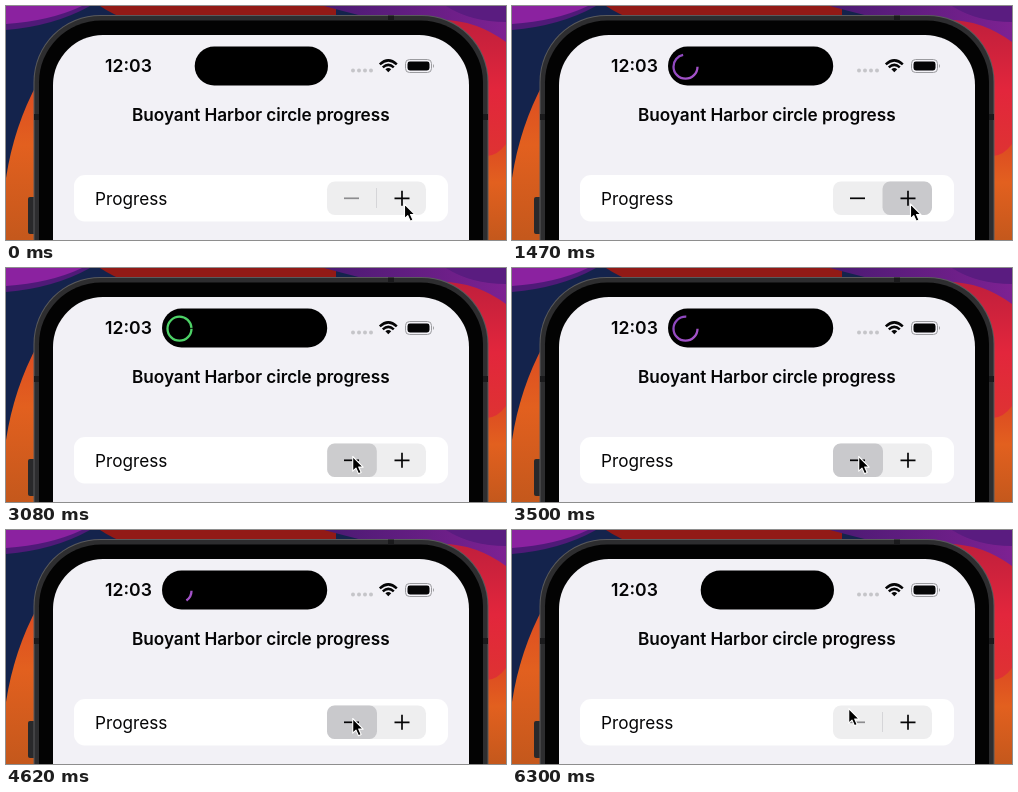
These frames come from a looping animation (500x234 px, 6370 ms). An HTML page:

```html
<!DOCTYPE html>
<html lang="en">
<head>
<meta charset="utf-8">
<title>Circle progress</title>
<style>
html, body { margin: 0; width: 100%; height: 100%; overflow: hidden; background: #14234c; }
svg { display: block; width: 500px; height: 234px; }
text { font-family: Inter, "Liberation Sans", sans-serif; fill: #050506; }
</style>
</head>
<body>
<svg viewBox="0 0 500 234">
  <defs>
    <linearGradient id="flame" x1="0" y1="0" x2="0" y2="1">
      <stop offset="0" stop-color="#dc4a22"/><stop offset=".4" stop-color="#e2601f"/><stop offset="1" stop-color="#c4581c"/>
    </linearGradient>
    <linearGradient id="rose" x1="0" y1="0" x2="0" y2="1">
      <stop offset="0" stop-color="#c01f3c"/><stop offset=".4" stop-color="#e2263c"/><stop offset="1" stop-color="#dc3a2c"/>
    </linearGradient>
    <linearGradient id="plum" x1="0" y1="0" x2="1" y2="0">
      <stop offset="0" stop-color="#4a1a72"/><stop offset="1" stop-color="#7d2192"/>
    </linearGradient>
    <linearGradient id="violet" gradientUnits="userSpaceOnUse" x1="161" y1="48" x2="186" y2="73">
      <stop offset="0" stop-color="#8a45bd"/><stop offset="1" stop-color="#a955cb"/>
    </linearGradient>
  </defs>

  <!-- wallpaper -->
  <rect width="500" height="234" fill="#14234c"/>
  <path d="M0 0H84Q48 20 0 24Z" fill="#4f1a78"/>
  <path d="M0 0H76Q44 15 0 18Z" fill="#8b22a0"/>
  <path d="M94 0H330V14H122Q106 8 94 0Z" fill="#921a16"/>
  <path d="M318 0H500V50L440 30Q370 14 318 0Z" fill="url(#plum)"/>
  <path d="M436 14Q470 14 500 36V190H470V60Z" fill="url(#rose)"/>
  <path d="M440 0H500V16Q465 16 440 0Z" fill="#5a1c80"/>
  <path d="M0 172Q8 120 32 76V234H0Z" fill="url(#flame)"/>
  <path d="M476 150Q490 152 500 138V234H476Z" fill="url(#flame)"/>

  <!-- phone -->
  <rect x="22" y="191" width="8" height="37" rx="2" fill="#29292b"/>
  <rect x="27.5" y="9" width="455" height="400" rx="67" fill="#5a5a5c"/>
  <rect x="28.5" y="10" width="453" height="400" rx="66" fill="#2d2d2f"/>
  <rect x="33" y="14.5" width="444" height="400" rx="62" fill="#030303"/>
  <path d="M28 108h5v6h-5zM477 108h5v6h-5zM382 9.5h6v5h-6z" fill="#1a1a1c"/>
  <rect x="47" y="29" width="416" height="380" rx="50" fill="#f2f1f6"/>

  <!-- status bar -->
  <text x="122.5" y="66" font-size="17.6" font-weight="600" text-anchor="middle">12:03</text>
  <g fill="#c5c5c9">
    <circle cx="347" cy="64.5" r="2"/><circle cx="353" cy="64.5" r="2"/>
    <circle cx="359" cy="64.5" r="2"/><circle cx="365" cy="64.5" r="2"/>
  </g>
  <g fill="none" stroke="#050506" stroke-width="2.5">
    <path d="M373.8 58.3Q382.3 50.4 390.8 58.3"/>
    <path d="M376.8 61.4Q382.3 56.4 387.8 61.4"/>
  </g>
  <path d="M379.4 63.3Q382.3 60.8 385.2 63.3L382.3 66.3Z" fill="#050506"/>
  <rect x="399.5" y="53.5" width="26" height="13" rx="4" fill="none" stroke="#9b9b9f"/>
  <rect x="401.5" y="55.5" width="22" height="9" rx="2.4" fill="#050506"/>
  <path d="M427 58Q429 60 427 62Z" fill="#9b9b9f"/>

  <!-- island -->
  <rect id="island" y="40.5" height="39" rx="19.5" fill="#000"/>
  <g id="badge" fill="none">
    <circle id="ring" cx="173.5" cy="60.7" r="12" pathLength="1" stroke-width="2.3"/>
    <path id="tick" d="M168.3 61.3L172 65L178.8 56.8" stroke="#4dd267" stroke-width="1.5" pathLength="1"/>
  </g>

  <text x="254.8" y="115" font-size="17.2" font-weight="600" letter-spacing="-.04" text-anchor="middle">Buoyant Harbor circle progress</text>

  <!-- stepper row -->
  <rect x="68" y="169" width="374" height="46.5" rx="11" fill="#fff"/>
  <text x="89" y="199" font-size="17.2">Progress</text>
  <rect x="321" y="175.5" width="99" height="33.5" rx="8" fill="#eeeeef"/>
  <path id="split" d="M370.5 182V202" stroke="#d5d5d8"/>
  <rect id="lessBg" x="321" y="175.5" width="50" height="33.5" rx="7.5" fill="#c9c9cc"/>
  <rect id="moreBg" x="370.5" y="175.5" width="49.5" height="33.5" rx="7.5" fill="#c9c9cc"/>
  <path id="less" d="M338 192.3H353" stroke-width="1.7"/>
  <path id="more" d="M388.5 192.3H403.5M396 184.8V199.8" stroke-width="1.7"/>
  <path id="cursor" d="M0 0V14.6L3.3 11.6L5.8 17.2L8.5 16L6 10.6H10.5Z" fill="#000" stroke="#fff" stroke-width="1.1" stroke-linejoin="round"/>
</svg>
<script>
const LOOP = 6370, STEP = 70;
const UP = [250, 1950], DOWN = [3060, 4900];
const $ = id => document.getElementById(id);
const set = (id, attrs) => {
  for (const k in attrs) $(id).setAttribute(k, attrs[k]);
};
const ramp = (t, a, b) => Math.min(1, Math.max(0, (t - a) / (b - a)));
const ease = (t, a, b) => {
  const x = ramp(t, a, b);
  return x * x * (3 - 2 * x);
};
const pulse = (t, a, b, fade) => ease(t, a, a + fade) - ease(t, b, b + fade);
const ink = off => off ? '#8c8c8f' : '#050506';

function press(id, amount, cx) {
  const s = 0.92 + 0.08 * amount;
  set(id, {
    opacity: amount,
    transform: `translate(${cx} 192.3) scale(${s}) translate(${-cx} -192.3)`
  });
}

function draw(t) {
  const p = ramp(t, ...UP) - ramp(t, ...DOWN);
  const full = p >= 1;

  const open = pulse(t, 200, 4920, 330);
  const x = 188.7 - 32.7 * open;
  set('island', { x, width: 322 - 0.8 * open - x });

  set('badge', { opacity: pulse(t, 260, 4850, 120) });
  set('ring', {
    stroke: t >= UP[1] && t < DOWN[0] + 100 ? '#4dd267' : 'url(#violet)',
    'stroke-dasharray': full ? 'none' : `${p} 2`
  });
  const tick = ramp(t, 1950, 2170);
  set('tick', {
    'stroke-dasharray': `${tick} 2`,
    opacity: tick > 0 ? 1 - ramp(t, 2960, 3070) : 0
  });

  const more = pulse(t, 130, 1960, 140);
  const less = pulse(t, 2950, 4920, 160);
  press('moreBg', more, 395.2);
  press('lessBg', less, 346);
  set('split', { opacity: 1 - Math.max(more, less) });
  set('less', { stroke: ink(p <= 0) });
  set('more', { stroke: ink(full) });

  const over = ease(t, 2400, 2870), away = ease(t, 5880, 6300);
  const cx = 398.5 - 51.8 * over - 10 * away;
  const cy = 198 - 9.5 * over - 10 * away;
  set('cursor', { transform: `translate(${cx} ${cy})` });
}

const start = performance.now();
function tick() {
  const t = (performance.now() - start) % LOOP;
  draw(Math.floor(t / STEP) * STEP);
  requestAnimationFrame(tick);
}
tick();
</script>
</body>
</html>
```
